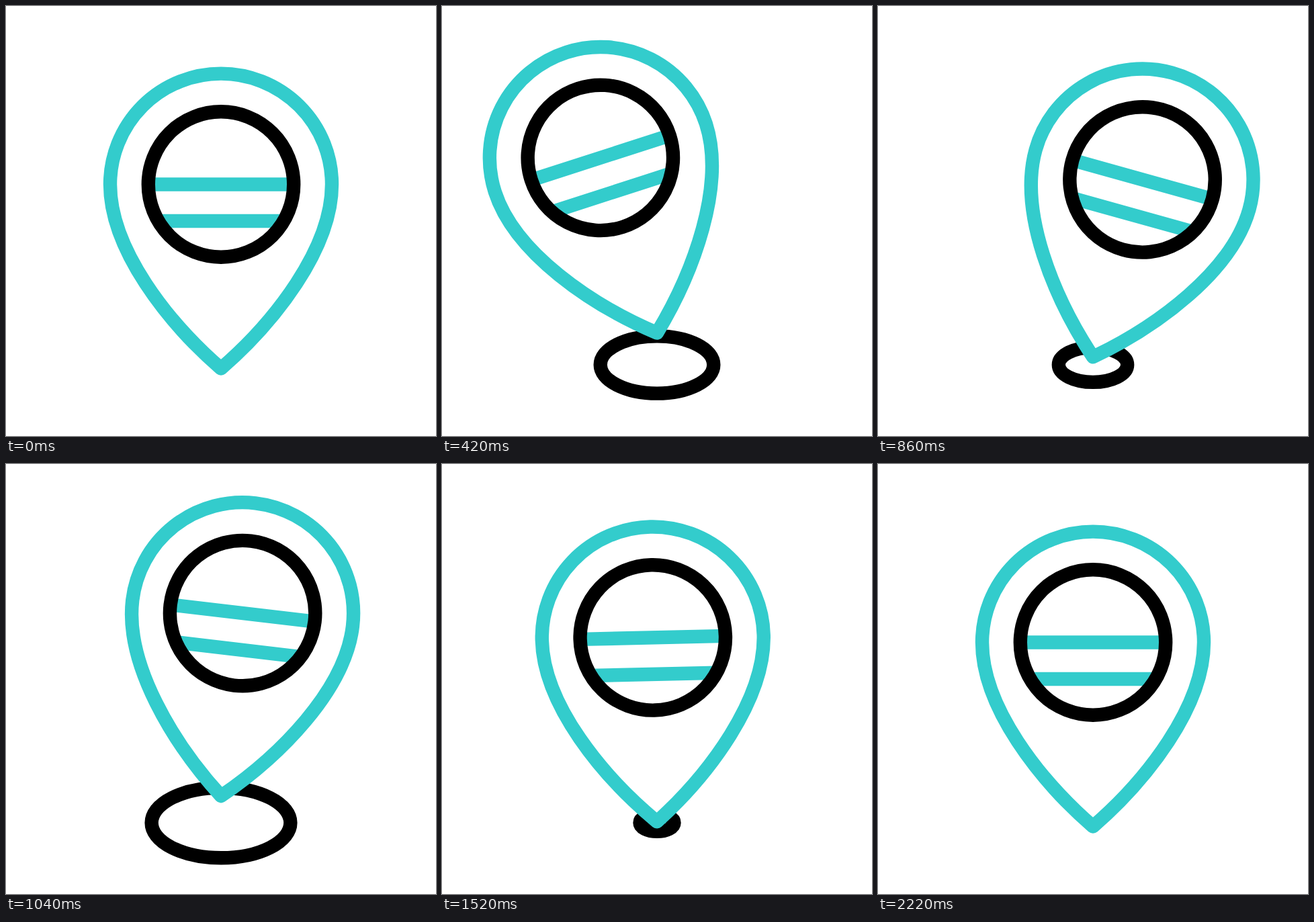
Animation of 640 by 640 pixels, one loop 2.4 s. Source, as an HTML page:

```html
<!DOCTYPE html>
<html lang="en">
<head>
<meta charset="utf-8">
<title>Bouncing map pin</title>
<style>
  html, body { margin: 0; height: 100%; overflow: hidden; background: #fff; }
  svg { display: block; width: 100vw; height: 100vh; }
</style>
</head>
<body>
<svg viewBox="0 0 640 640" fill="none" stroke="#000" stroke-width="20.4">
  <ellipse class="ring" cx="320" cy="534"/>
  <ellipse class="ring" cx="320" cy="534"/>
  <ellipse class="ring" cx="320" cy="534"/>
  <g id="pin">
    <path d="M155 265.5A165 165 0 0 1 485 265.5C485 362 399 471 320 539.5C241 471 155 362 155 265.5Z"
          fill="#fff" stroke="#3cc" stroke-linejoin="round"/>
    <path d="M212 265.5H428M226.5 320H413.5" stroke="#3cc"/>
    <circle cx="320" cy="265.5" r="108.2"/>
  </g>
</svg>
<script>
const LOOP = 2400;
const pin = document.getElementById('pin');
const rings = document.querySelectorAll('.ring');

// [time, value] keys, eased in and out between neighbours
const tilt = [[0, 0], [400, -18.1], [835, 15.75], [1324, -8], [1690, 4.1], [2080, -0.6], [2220, 0]];
const lift = [[0, 0], [350, 58.5], [715, 0], [1065, 46], [1415, 0], [1775, 35], [2130, 0]];
// [start, duration] of each ripple
const ripples = [[165, 608], [699, 651], [1430, 745]];

function valueAt(keys, t) {
  const next = keys.findIndex(key => key[0] > t);
  if (next < 0) return keys[keys.length - 1][1];
  const [t0, v0] = keys[next - 1], [t1, v1] = keys[next];
  const p = (t - t0) / (t1 - t0);
  return v0 + (v1 - v0) * p * p * (3 - 2 * p);
}

function drawRipple(ring, [start, duration], t) {
  const p = (t - start) / duration;
  const visible = p > 0 && p < 1;
  const radius = visible ? 181 * (p + 0.19 * p * (1 - p)) : 0;
  const fade = Math.max(0, (p - 0.55) / 0.45);
  ring.setAttribute('rx', radius);
  ring.setAttribute('ry', radius * 0.506);
  ring.setAttribute('opacity', visible ? 1 - fade * fade : 0);
}

function draw(now) {
  const t = now % LOOP;
  pin.setAttribute('transform',
    `translate(0 ${-valueAt(lift, t)}) rotate(${valueAt(tilt, t)} 320 539.5)`);
  rings.forEach((ring, i) => drawRipple(ring, ripples[i], t));
}

let origin;
function tick(now) {
  origin ??= now;
  draw(now - origin);
  requestAnimationFrame(tick);
}
draw(0);
requestAnimationFrame(tick);
</script>
</body>
</html>
```
